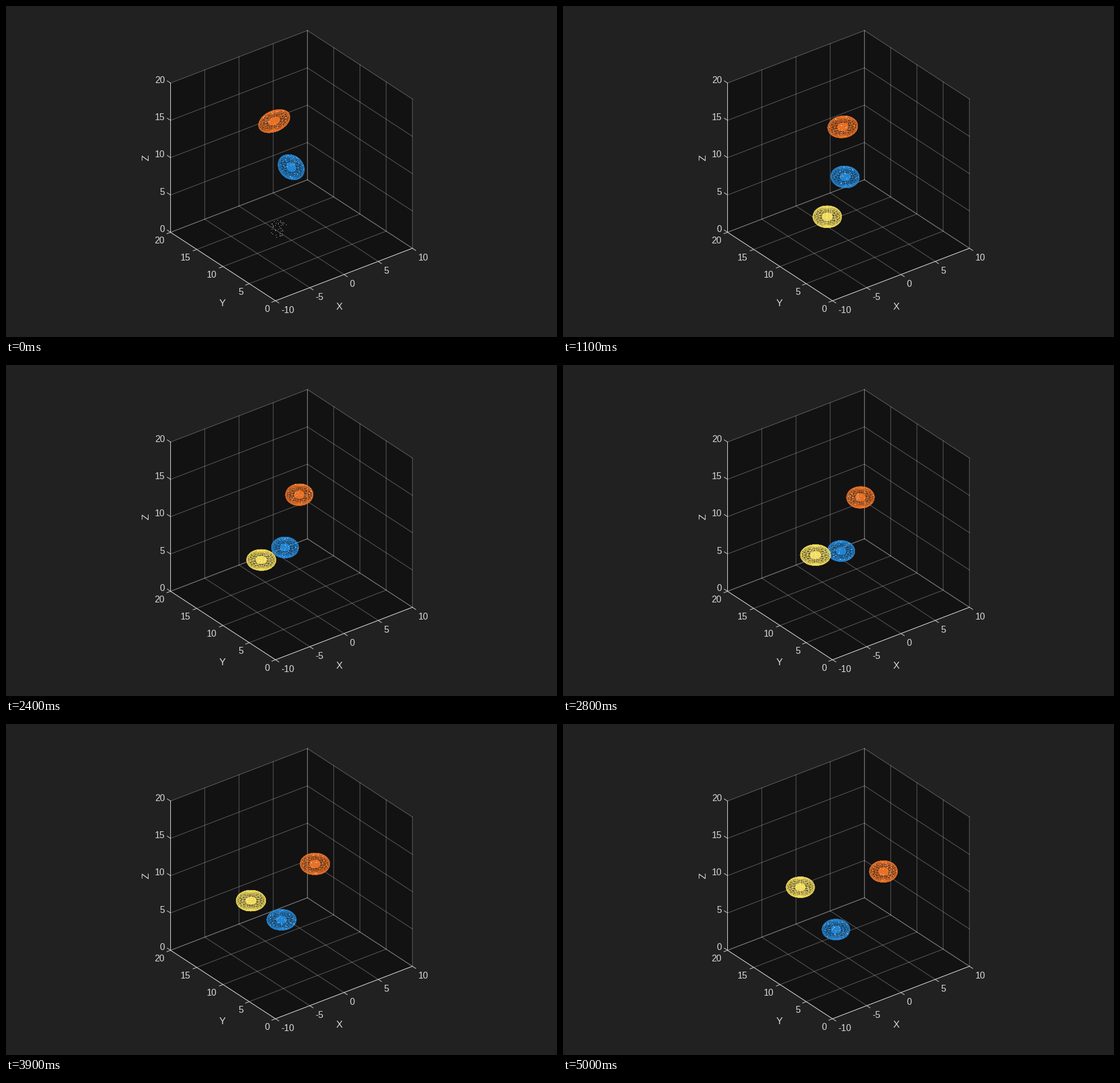
Recreate the animation shown at these times as a matplotlib script. Size 966 by 580 pixels, loop 5100 ms.

```python
import numpy as np
import matplotlib.pyplot as plt
from matplotlib.animation import FuncAnimation
from matplotlib.collections import LineCollection
from matplotlib.patches import Polygon

W, H, DPI = 966, 580, 100
PX = 72 / DPI
FRAMES, INTERVAL = 51, 100
INK = "#d9d9d9"

plt.rcParams["font.family"] = "Liberation Sans"
plt.rcParams["path.snap"] = False
fig = plt.figure(figsize=(W / DPI, H / DPI), dpi=DPI, facecolor="#212121")
ax = fig.add_axes([0, 0, 1, 1])
ax.set_xlim(0, W)
ax.set_ylim(H, 0)
ax.axis("off")

# Orthographic box: screen position of (-10, 20, 0) and the three edge vectors
ORIGIN = np.array([288.5, 396.5])
EX, EY, EZ = np.array([240, -92]), np.array([184, 120]), np.array([0, -261.5])


def at(x, y, z):
    """Screen point for fractions along X, along Y toward the viewer, and Z."""
    return ORIGIN + x * EX + y * EY + z * EZ


def line(p, q, **style):
    ax.plot(*zip(p, q), **style)


def draw_box():
    u, v, w = np.eye(3)
    planes = [(0 * u, u, v), (0 * u, u, w), (u, v, w)]
    grid = dict(color=INK, alpha=0.3, lw=1.3 * PX, zorder=1)
    for base, s, t in planes:
        corners = [at(*c) for c in (base, base + s, base + s + t, base + t)]
        ax.add_patch(Polygon(corners, fc="#121212", lw=0, zorder=0))
        for f in np.linspace(0, 1, 5):
            line(at(*(base + f * s)), at(*(base + f * s + t)), **grid)
            line(at(*(base + f * t)), at(*(base + f * t + s)), **grid)


def draw_axes():
    ink = dict(color=INK, lw=PX, zorder=2)
    line(at(0, 0, 0), at(0, 0, 1), **ink)
    line(at(0, 0, 0), at(0, 1, 0), **ink)
    line(at(0, 1, 0), at(1, 1, 0), **ink)
    out_y = 7 * EY / np.hypot(*EY)
    out_x = -7 * EX / np.hypot(*EX)
    for i, f in enumerate(np.linspace(0, 1, 5)):
        ticks = [
            (at(f, 1, 0), out_y, 5 * i - 10, (4, 11.5), "left"),
            (at(0, f, 0), out_x, 20 - 5 * i, (-4, 10.5), "right"),
            (at(0, 0, f), -out_y, 5 * i, (-4, -2.5), "right"),
        ]
        for p, step, value, gap, side in ticks:
            end = p + step
            line(p, end, **ink)
            ax.text(*(end + gap), str(value), color=INK, fontsize=16 * PX,
                    ha=side, va="center_baseline")
    for x, y, name, turn in [(584, 528, "X", 0), (379, 521, "Y", 0), (246, 266, "Z", 90)]:
        ax.text(x, y, name, color=INK, fontsize=17 * PX, rotation=turn,
                ha="center", va="center")


def sphere_mesh(meridians=20, parallels=13, tilt=np.radians(30)):
    """Projected unit-sphere wireframe seen from an elevation of `tilt`."""
    def project(lon, lat):
        depth = np.cos(lat) * np.sin(lon)
        u = np.cos(lat) * np.cos(lon)
        v = depth * np.sin(tilt) + np.sin(lat) * np.cos(tilt)
        return np.stack(np.broadcast_arrays(u, v), axis=-1)

    t = np.linspace(0, 1, 41)
    curves = [project(lon, (t - 0.5) * np.pi)
              for lon in np.arange(meridians) * 2 * np.pi / meridians]
    curves += [project(t * 2 * np.pi, lat)
               for lat in np.linspace(-np.pi / 2, np.pi / 2, parallels + 2)[1:-1]]
    return np.array(curves)


MESH = sphere_mesh()
TURN = np.linspace(0, 2 * np.pi, 60)
RING = np.column_stack([np.cos(TURN), np.sin(TURN)])
CORE = 0.38


class Track:
    """Ellipsoid in steady motion whose estimate settles after a rough start.

    `first` and `settled` hold half width, half height and slant.
    """

    def __init__(self, color, seed, pos, vel, kick, first, settled,
                 phase=0, start=0, spread=0.95):
        self.seed, self.phase, self.start, self.spread = seed, phase, start, spread
        self.pos, self.vel, self.kick, self.first, self.settled = map(
            np.array, (pos, vel, kick, first, settled))
        self.body = Polygon(RING, fc=color, alpha=0.27, lw=0, zorder=3)
        self.rim = Polygon(RING, fc="none", ec=color, alpha=0.3, lw=PX, zorder=4)
        self.core = Polygon(RING, fc=color, alpha=0.88, lw=0, zorder=5)
        self.mesh = LineCollection([], colors=color, alpha=0.36, linewidths=0.6 * PX,
                                   antialiaseds=False, zorder=4)
        for patch in (self.body, self.rim, self.core):
            ax.add_patch(patch)
        ax.add_collection(self.mesh, autolim=False)
        self.dots, = ax.plot([], [], ",", color="white", alpha=0.85, zorder=6)

    def pose(self, t):
        center = self.pos + self.vel * t + self.kick * np.exp(-t / 0.4)
        w, h, slant = self.settled + (self.first - self.settled) * np.exp(-t / 0.8)
        w += (1 - np.exp(-t / 0.8)) * np.sin(2 * (t - 3.2) + self.phase)
        return center, w, h, slant

    def update(self, frame):
        center, w, h, slant = self.pose(frame / 10)
        cov = np.array([[w * w, slant * w * h], [slant * w * h, h * h]])
        size, axes = np.linalg.eigh(cov)
        shape = axes @ np.diag(np.sqrt(size)) @ axes.T

        def place(points):
            return points @ shape + center

        self.body.set_xy(place(RING))
        self.rim.set_xy(place(RING * 0.985))
        self.core.set_xy(place(RING * CORE))
        self.mesh.set_segments(place(MESH))
        for artist in (self.body, self.rim, self.core, self.mesh):
            artist.set_visible(frame >= self.start)

        rng = np.random.default_rng([self.seed, frame])
        radius = self.spread * np.sqrt(rng.random(40))
        angle = rng.uniform(0, 2 * np.pi, 40)
        self.dots.set_data(*place(np.column_stack([radius * np.cos(angle),
                                                   radius * np.sin(angle)])).T)
        return self.body, self.rim, self.core, self.mesh, self.dots


draw_box()
draw_axes()

tracks = [
    Track("#268cdd", 1, pos=(499, 282.4), vel=(-4.1, 15.55), kick=(1, 0),
          first=(23, 22, 0.2), settled=(24.8, 18.2, 0)),
    Track("#f57729", 2, pos=(470.3, 198.4), vel=(18.3, 12), kick=(0, 3.3),
          first=(27.5, 20.2, -0.35), settled=(25, 18.9, 0)),
    Track("#ffe864", 3, pos=(476.6, 393), vel=(-12.1, -21.4), kick=(0, -2),
          first=(25, 22, 0), settled=(25.8, 18.2, 0),
          phase=np.pi / 2, start=1, spread=0.7),
]


def update(frame):
    return [artist for track in tracks for artist in track.update(frame)]


anim = FuncAnimation(fig, update, frames=FRAMES, interval=INTERVAL,
                     repeat=True, repeat_delay=0, blit=False)
plt.show()
```
